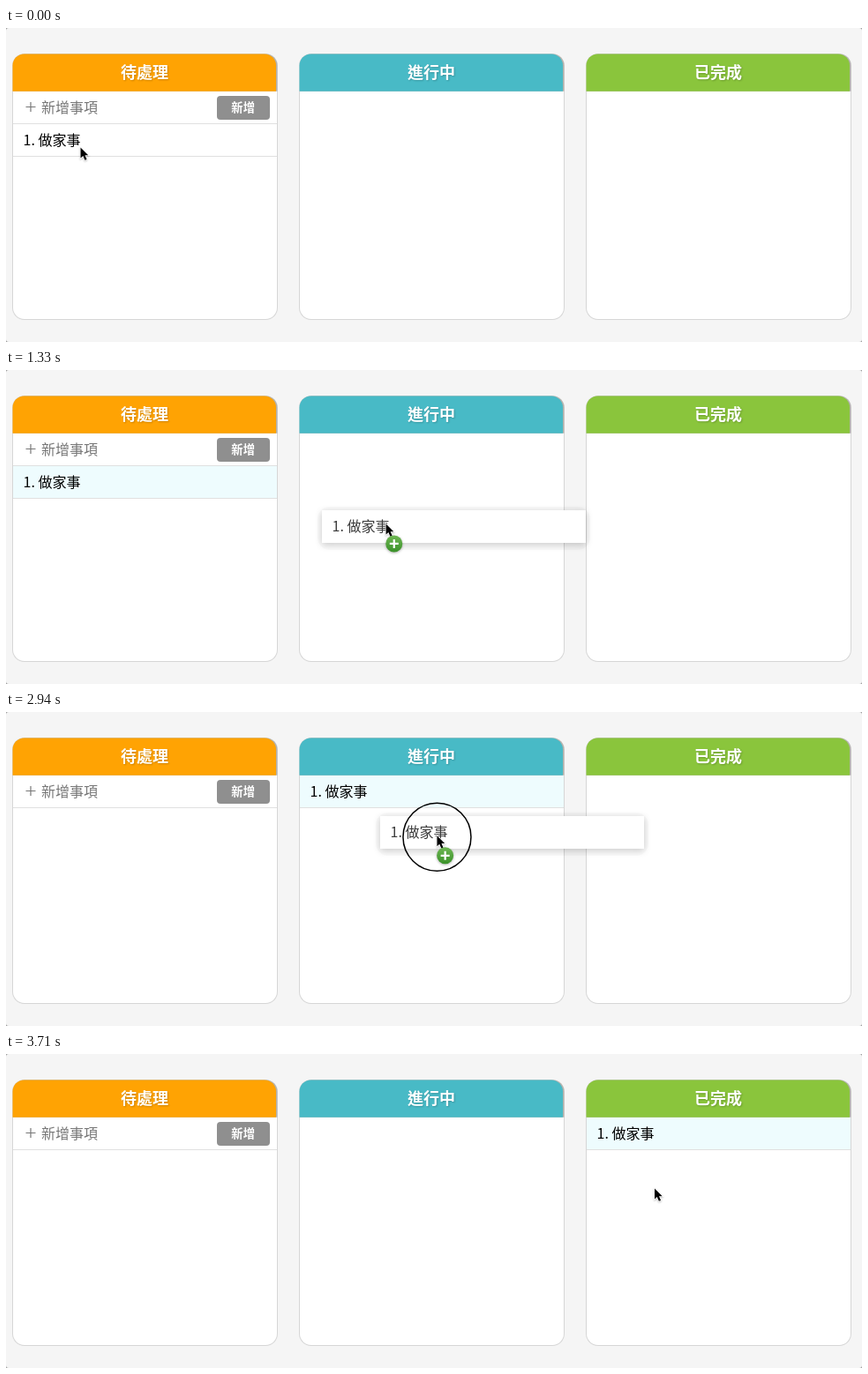
These frames come from a looping animation (970 px wide and 356 px high, 3.78 s). An HTML page with a canvas:

```html
<!DOCTYPE html>
<html lang="zh-Hant">
<head>
<meta charset="utf-8">
<title>待辦看板</title>
<style>
  html, body { margin: 0; width: 100%; height: 100%; overflow: hidden; background: #f5f5f5; }
  canvas { display: block; }
</style>
</head>
<body>
<canvas id="stage" width="970" height="356"></canvas>
<script>
const ctx = document.getElementById('stage').getContext('2d');
const FONT = '"Noto Sans CJK TC", "Noto Sans CJK", "Noto Sans", sans-serif';
const LOOP = 3780, STEP = 70, ROW_W = 299, ROW_H = 36;
const RING = 38.5, RING_FADE = 150;
const TASK = '1. 做家事';

const columns = [
  { x: 7, title: '待處理', color: '#ffa303' },
  { x: 332, title: '進行中', color: '#48bac6' },
  { x: 657, title: '已完成', color: '#8ac53c' },
];

// Pointer strokes; a stroke with a press also carries the task to the next column
const moves = [
  { start: 0, end: 420, from: [84.5, 135.5], to: [80.5, 124] },
  { start: 526, end: 1369, from: [80.5, 124], to: [431.5, 174.5], sag: 13.5, press: 350, release: 1300 },
  { start: 2030, end: 2450, from: [431.5, 174.5], to: [391.5, 94] },
  { start: 2450, end: 2590, from: [391.5, 94], to: [397, 94] },
  { start: 2790, end: 3650, from: [397, 94], to: [735, 152.5], sag: 32, press: 2600, release: 3305 },
];
const drags = moves.filter(m => m.press);

const clamp = v => Math.max(0, Math.min(1, v));
const lerp = (a, b, k) => a + (b - a) * k;

function pointerAt(t) {
  const { start, end, from, to, sag = 0 } = moves.findLast(m => m.start <= t);
  const k = Math.sin(clamp((t - start) / (end - start)) * Math.PI / 2);
  const dip = sag * Math.sin(Math.PI * k ** 0.7);
  return [lerp(from[0], to[0], k), lerp(from[1], to[1], k) + dip];
}

function ringRadius(t) {
  const sizes = drags.map(d => clamp(Math.min(t - d.press, d.release - t) / RING_FADE));
  return RING * Math.max(...sizes);
}

function box(x, y, w, h, radius, fill) {
  ctx.beginPath();
  ctx.roundRect(x, y, w, h, radius);
  ctx.fillStyle = fill;
  ctx.fill();
}

function text(str, x, y, size, color, weight = 400, align = 'left') {
  ctx.font = `${weight} ${size}px ${FONT}`;
  ctx.textAlign = align;
  ctx.fillStyle = color;
  ctx.fillText(str, x, y);
}

function plus(x, y, half, width, color) {
  ctx.beginPath();
  ctx.moveTo(x - half, y);
  ctx.lineTo(x + half, y);
  ctx.moveTo(x, y - half);
  ctx.lineTo(x, y + half);
  ctx.lineWidth = width;
  ctx.strokeStyle = color;
  ctx.stroke();
}

function shadow(color, blur, dx, dy) {
  ctx.shadowColor = color;
  ctx.shadowBlur = blur;
  ctx.shadowOffsetX = dx;
  ctx.shadowOffsetY = dy;
}

function drawColumn({ x, title, color }) {
  box(x, 29, 301, 302, 14, '#d6d6d6');
  box(x + 1, 30, ROW_W, 300, 13, '#fff');
  box(x + 1, 29.5, ROW_W + 0.5, 42.2, [13, 13, 0, 0], '#b4b2ac');
  box(x + 0.5, 29.5, ROW_W - 0.5, 42.2, [13, 13, 0, 0], color);
  ctx.save();
  shadow('rgba(0,0,0,.2)', 2, 1, 1);
  text(title, x + 150, 57, 18, '#fff', 700, 'center');
  ctx.restore();
}

function drawInputRow() {
  plus(28, 89.5, 5.5, 1.2, '#777');
  text('新增事項', 40, 95.5, 16, '#777');
  box(239, 77, 60, 27, 4, '#8f8f8f');
  text('新增', 268.7, 95.3, 13.33, '#fff', 700, 'center');
  box(8, 108, ROW_W, 1, 0, '#e0e0e0');
}

function drawTask(x, y, lit) {
  if (lit) box(x, y, ROW_W, ROW_H, 0, '#eefcfe');
  box(x, y + ROW_H, ROW_W, 1, 0, '#e0e0e0');
  text(TASK, x + 11.5, y + 24, 16, '#000');
}

function drawGhost(x, y) {
  box(x - 5, y - 4, ROW_W + 10, ROW_H + 13, 14, 'rgba(0,0,0,.018)');
  ctx.save();
  shadow('rgba(0,0,0,.2)', 8, 0, 2);
  box(x, y, ROW_W, ROW_H + 1, 0, '#fff');
  ctx.restore();
  text(TASK, x + 11.5, y + 24, 16, '#3c3c3c');
}

function drawRing(x, y, radius) {
  ctx.beginPath();
  ctx.arc(x, y, radius, 0, 2 * Math.PI);
  ctx.lineWidth = 1.5;
  ctx.strokeStyle = '#000';
  ctx.stroke();
}

function drawPointer(x, y) {
  ctx.save();
  ctx.translate(x, y);
  ctx.scale(0.93, 0.93);
  ctx.beginPath();
  [[0, 0], [0, 13], [3, 10.3], [5.2, 15.4], [7.6, 14.4], [5.4, 9.4], [9.4, 9.4]]
    .forEach(point => ctx.lineTo(...point));
  ctx.closePath();
  shadow('rgba(0,0,0,.25)', 2, 0, 1);
  ctx.lineWidth = 1.6;
  ctx.strokeStyle = '#fff';
  ctx.stroke();
  shadow('transparent', 0, 0, 0);
  ctx.fillStyle = '#000';
  ctx.fill();
  ctx.restore();
}

function drawBadge(x, y) {
  const green = ctx.createLinearGradient(0, y - 9, 0, y + 9);
  green.addColorStop(0, '#6db652');
  green.addColorStop(1, '#3b922a');
  ctx.save();
  shadow('rgba(0,0,0,.3)', 3, 0, 1);
  box(x - 9.5, y - 9.5, 19, 19, 9.5, green);
  ctx.restore();
  plus(x, y, 5, 2.2, '#fff');
}

function draw(t) {
  ctx.fillStyle = '#999';
  ctx.fillRect(0, 0, 970, 356);
  box(0, 0, 970, 356, 3, '#f5f5f5');
  columns.forEach(drawColumn);
  drawInputRow();

  // Each finished drag puts the task one column further; it stays lit until the pointer leaves
  const [x, y] = pointerAt(t);
  const col = drags.filter(d => t > d.end).length;
  const rowX = columns[col].x + 1, rowY = col ? 72 : 109;
  const drag = drags.find(d => t >= d.start && t <= d.end);
  const lit = drags.some(d => t >= d.press + RING_FADE / 2 && t < d.end + 750);
  drawTask(rowX, rowY, lit);

  if (drag) {
    const [grabX, grabY] = drag.from;
    drawGhost(Math.floor(rowX + x - grabX), Math.floor(rowY + y - grabY));
  }
  const radius = ringRadius(t);
  if (radius > 0) drawRing(x, y + 1.5, radius);
  drawPointer(x, y);
  const overColumn = columns.some(c => x > c.x && x < c.x + 301);
  if (drag && overColumn) drawBadge(x + 9.2, y + 22.5);
}

const start = performance.now();
function tick() {
  const elapsed = (performance.now() - start) % LOOP;
  draw(Math.floor(elapsed / STEP) * STEP);
  requestAnimationFrame(tick);
}
tick();
</script>
</body>
</html>
```
